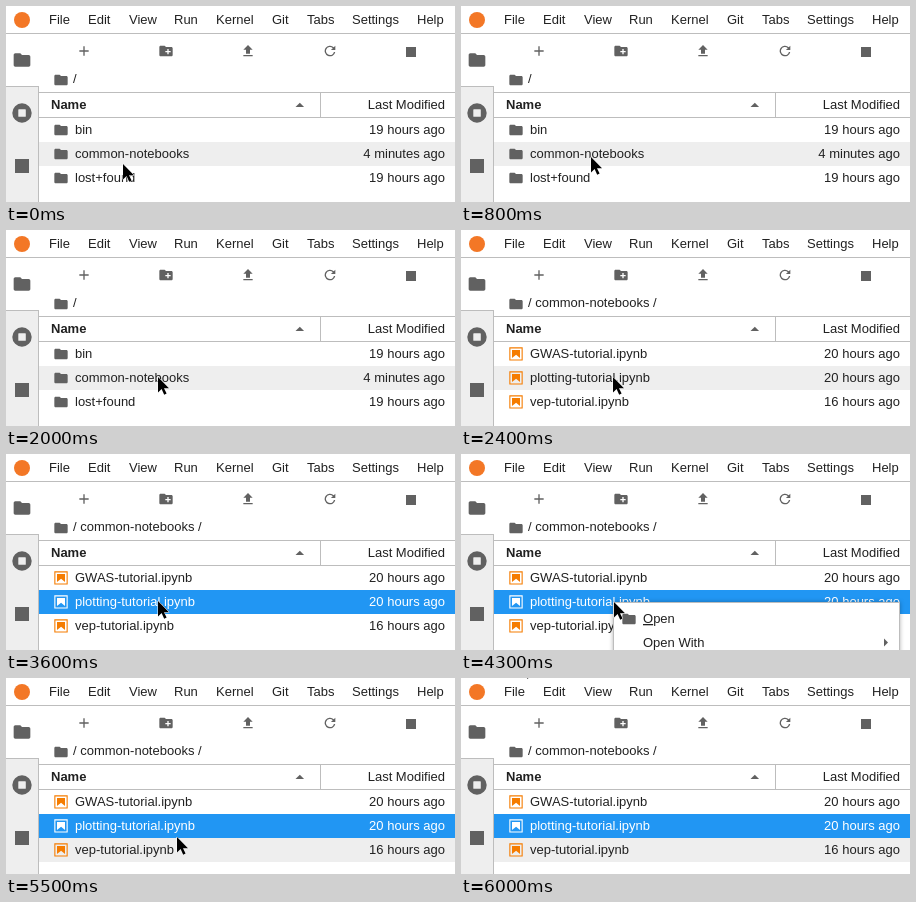
An HTML page that plays this animation: 449 px wide and 196 px high, repeating every 6300 ms.

```html
<!DOCTYPE html>
<html lang="en">
<head>
<meta charset="utf-8">
<title>File browser</title>
<style>
html, body { margin: 0; width: 100%; height: 100%; overflow: hidden; background: #fff; }
svg { display: block; width: 449px; height: 196px; }
text { font: 13px "Liberation Sans", Arial, sans-serif; fill: #212121; white-space: pre; }
.end { text-anchor: end; }
.bold { font-weight: bold; }
.icon { fill: #616161; }
.book { fill: #f57c00; }
.line { fill: #bdbdbd; }
.hover { fill: #eee; }
.selected rect { fill: #2196f3; }
.selected text, .selected use { fill: #fff; }
.tip text { font: 14.1px "Noto Sans", sans-serif; fill: #fff; }
.panel { fill: #fff; stroke: #bdbdbd; filter: drop-shadow(0 0 2px rgba(0, 0, 0, .3)); }

.timed { animation: 6300ms step-end infinite; }
.root { animation-name: root; }
.folder { animation-name: folder; }
.tip { animation-name: tip; }
.pick-folder { animation-name: pick-folder; }
.pick-book { animation-name: pick-book; }
.menu { animation-name: menu; }
.menu-hover { animation-name: menu-hover; }
.row-hover { animation-name: row-hover; }
.pointer { animation-name: pointer; }

@keyframes root { 0% { opacity: 1 } 38.095%, to { opacity: 0 } }
@keyframes folder { 0% { opacity: 0 } 38.095%, to { opacity: 1 } }
@keyframes tip { 0% { opacity: 0 } 19.047% { opacity: 1 } 31.746%, to { opacity: 0 } }
@keyframes pick-folder { 0% { opacity: 0 } 33.333% { opacity: 1 } 38.095%, to { opacity: 0 } }
@keyframes pick-book { 0% { opacity: 0 } 57.142%, to { opacity: 1 } }
@keyframes menu { 0% { opacity: 0 } 60.317% { opacity: 1 } 87.301%, to { opacity: 0 } }
@keyframes menu-hover { 0% { opacity: 0 } 71.428%, to { opacity: 1 } }
@keyframes row-hover { 0% { opacity: 0 } 87.301%, to { opacity: 1 } }
@keyframes pointer {
  0% { transform: translate(116px, 157px) }
  7.936% { transform: translate(116px, 156px) }
  11.111% { transform: translate(120px, 154px) }
  12.698% { transform: translate(129px, 150px) }
  14.285% { transform: translate(140px, 147px) }
  15.873% { transform: translate(148px, 145px) }
  17.46% { transform: translate(151px, 146px) }
  68.253% { transform: translate(152px, 147px) }
  69.841% { transform: translate(156px, 150px) }
  71.428% { transform: translate(162px, 154px) }
  73.015% { transform: translate(168px, 157px) }
  74.603% { transform: translate(170px, 158px) }
  90.476% { transform: translate(161px, 145px) }
  92.063% { transform: translate(129px, 96px) }
  93.65% { transform: translate(87px, 32px) }
  95.238%, to { transform: translate(59px, -18px) }
}
</style>
</head>
<body>
<svg viewBox="0 0 449 196">
  <defs>
    <symbol id="dir" viewBox="0 0 24 24"><path d="M10 4H4c-1.1 0-2 .9-2 2v12c0 1.1.9 2 2 2h16c1.1 0 2-.9 2-2V8c0-1.1-.9-2-2-2h-8z"/></symbol>
    <symbol id="new-dir" viewBox="0 0 24 24"><path d="M20 6h-8l-2-2H4c-1.1 0-2 .9-2 2v12c0 1.1.9 2 2 2h16c1.1 0 2-.9 2-2V8c0-1.1-.9-2-2-2zm-1 8h-3v3h-2v-3h-3v-2h3V9h2v3h3z"/></symbol>
    <symbol id="add" viewBox="0 0 24 24"><path d="M19 13h-6v6h-2v-6H5v-2h6V5h2v6h6z"/></symbol>
    <symbol id="upload" viewBox="0 0 24 24"><path d="M9 16h6v-6h4l-7-7-7 7h4zm-4 2h14v2H5z"/></symbol>
    <symbol id="refresh" viewBox="0 0 18 18"><path d="M9 13.5a4.5 4.5 0 1 1 3.17-7.67L10 8h5V3l-1.76 1.76A6 6 0 1 0 14.9 10h-1.52A4.5 4.5 0 0 1 9 13.5z"/></symbol>
    <symbol id="book" viewBox="0 0 22 22"><path d="M18.7 3.3v15.4H3.3V3.3zm1.5-1.5H1.8v18.3h18.4zM16.5 16.5l-5.4-4.3-5.6 4.3v-11h11z"/></symbol>
  </defs>

  <!-- Menu bar -->
  <circle cx="16" cy="14" r="8" fill="#f37726"/>
  <g>
    <text x="43" y="18">File</text>
    <text x="82" y="18">Edit</text>
    <text x="123" y="18">View</text>
    <text x="168" y="18">Run</text>
    <text x="210" y="18">Kernel</text>
    <text x="266" y="18">Git</text>
    <text x="301" y="18">Tabs</text>
    <text x="346" y="18">Settings</text>
    <text x="411" y="18">Help</text>
  </g>
  <rect class="line" y="27" width="449" height="1"/>

  <!-- Sidebar -->
  <rect class="hover" y="80" width="33" height="116"/>
  <path class="line" d="M0 80h33v116h-1V81H0z"/>
  <g class="icon">
    <use href="#dir" x="6" y="44" width="20" height="20"/>
    <path fill-rule="evenodd" d="M6.3 107a9.7 9.7 0 1 1 19.4 0a9.7 9.7 0 1 1-19.4 0zM12.3 103.8v6.4q0 .6.6.6h6.3q.6 0 .6-.6v-6.4q0-.6-.6-.6h-6.3q-.6 0-.6.6z"/>
    <rect x="9" y="153" width="14" height="14"/>
  </g>

  <!-- Toolbar -->
  <g class="icon">
    <use href="#add" x="70" y="37" width="16" height="16"/>
    <use href="#new-dir" x="152" y="37" width="16" height="16"/>
    <use href="#upload" x="234" y="37" width="16" height="16"/>
    <use href="#refresh" x="316" y="37" width="16" height="16"/>
    <rect x="400" y="41" width="10" height="10"/>
    <use href="#dir" x="47" y="66" width="16" height="16"/>
  </g>

  <!-- Column header -->
  <path class="line" d="M33 86h416v1H33zM33 111h416v1H33zM314 87h1v24h-1z"/>
  <text class="bold" x="45" y="103">Name</text>
  <path class="icon" d="M289.5 101l4.3-4.3 4.3 4.3z"/>
  <text class="end" x="439" y="103">Last Modified</text>

  <!-- Listing -->
  <rect class="hover" x="33" y="136" width="416" height="24"/>
  <g class="timed root">
    <text x="67" y="77">/</text>
    <g class="icon">
      <use href="#dir" x="47" y="116" width="16" height="16"/>
      <use href="#dir" x="47" y="140" width="16" height="16"/>
      <use href="#dir" x="47" y="164" width="16" height="16"/>
    </g>
    <text x="69" y="128">bin</text>
    <text class="end" x="439" y="128">19 hours ago</text>
    <text x="69" y="152">common-notebooks</text>
    <text class="end" x="439" y="152">4 minutes ago</text>
    <text x="69" y="176">lost+found</text>
    <text class="end" x="439" y="176">19 hours ago</text>
  </g>
  <g class="timed selected pick-folder" opacity="0">
    <rect x="33" y="136" width="416" height="24"/>
    <use href="#dir" x="47" y="140" width="16" height="16"/>
    <text x="69" y="152">common-notebooks</text>
    <text class="end" x="439" y="152">4 minutes ago</text>
  </g>
  <g class="timed folder" opacity="0">
    <rect class="hover timed row-hover" x="33" y="160" width="416" height="24"/>
    <text x="67" y="77">/ common-notebooks /</text>
    <g class="book">
      <use href="#book" x="47" y="116" width="16" height="16"/>
      <use href="#book" x="47" y="140" width="16" height="16"/>
      <use href="#book" x="47" y="164" width="16" height="16"/>
    </g>
    <text x="69" y="128">GWAS-tutorial.ipynb</text>
    <text class="end" x="439" y="128">20 hours ago</text>
    <text x="69" y="152">plotting-tutorial.ipynb</text>
    <text class="end" x="439" y="152">20 hours ago</text>
    <text x="69" y="176">vep-tutorial.ipynb</text>
    <text class="end" x="439" y="176">16 hours ago</text>
  </g>
  <g class="timed selected pick-book" opacity="0">
    <rect x="33" y="136" width="416" height="24"/>
    <use href="#book" x="47" y="140" width="16" height="16"/>
    <text x="69" y="152">plotting-tutorial.ipynb</text>
    <text class="end" x="439" y="152">20 hours ago</text>
  </g>

  <!-- Overlays -->
  <g class="timed tip" opacity="0">
    <rect x="162" y="162" width="150" height="28"/>
    <text x="170" y="181">common-notebooks</text>
  </g>
  <g class="timed menu" opacity="0">
    <rect class="panel" x="152.5" y="148.5" width="286" height="80"/>
    <rect class="hover timed menu-hover" x="153" y="153" width="285" height="24"/>
    <use class="icon" href="#dir" x="160" y="157" width="16" height="16"/>
    <text x="182" y="169"><tspan text-decoration="underline">O</tspan>pen</text>
    <text x="182" y="193">Open With</text>
    <path class="icon" d="M423 184.500l4 4-4 4z"/>
  </g>
  <path class="timed pointer" d="M1 1v15.500l3.600-3.400 2.600 5.600 2.400-1.100-2.600-5.400h5z" stroke="#fff" paint-order="stroke"/>
</svg>
</body>
</html>
```
